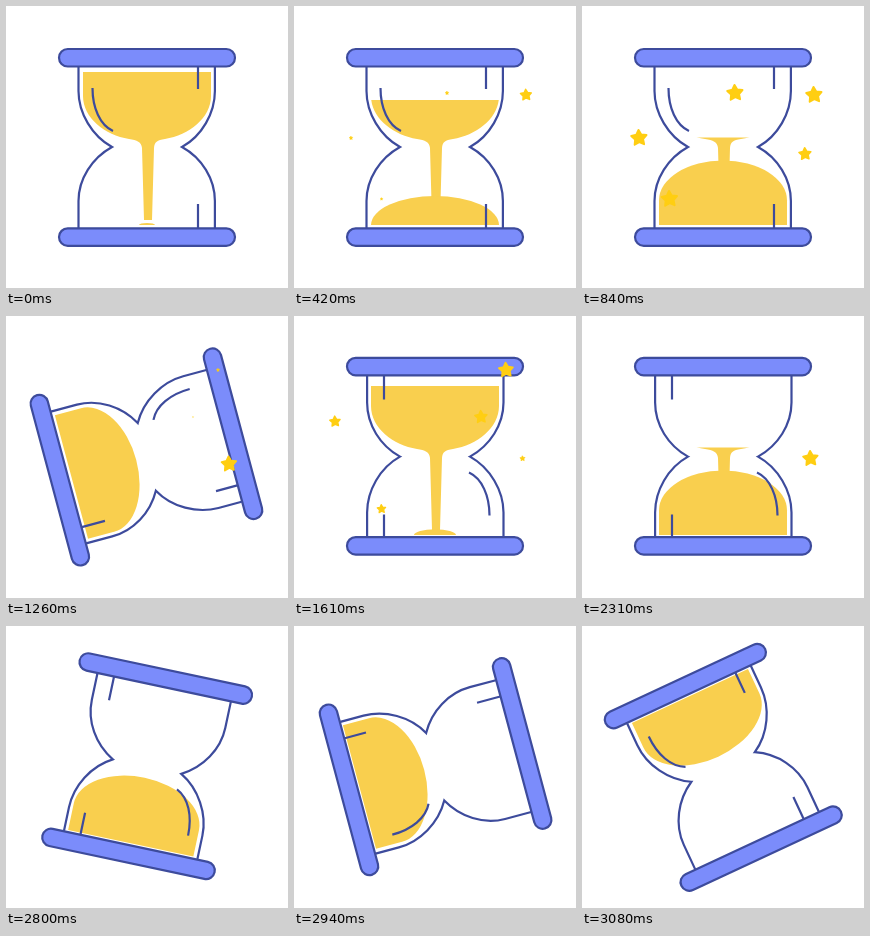
An HTML page that plays this animation: 282 px wide and 282 px high, repeating every 3150 ms.

```html
<!DOCTYPE html>
<html lang="en">
<head>
<meta charset="utf-8">
<title>Hourglass</title>
<style>
html, body { margin: 0; width: 100%; height: 100%; overflow: hidden; background: #fff }
svg { display: block; width: 100%; height: 100% }
.line { fill: none; stroke: #3d4b9c; stroke-width: 2.2; stroke-linecap: butt }
.bar { fill: #7b8cfb; stroke: #3d4b9c; stroke-width: 2.2 }
.sand { fill: #f9cf4e }
#stars { fill: #ffce12; stroke: #ffce12; stroke-width: .25; stroke-linejoin: round }
</style>
</head>
<body>
<svg viewBox="0 0 282 282">
  <clipPath id="above"><rect id="level" x="60" width="162" height="160"/></clipPath>
  <g id="sand" class="sand">
    <path clip-path="url(#above)" d="M77 60V90C77 112 99 129 123 133C131 134 135.5 136 136 142L138 214H146L148 142C148.500 136 151 134 159 133C183 129 205 112 205 90V60Z"/>
    <path id="pile"/>
  </g>
  <g id="glass">
    <path class="line" d="M72.500 61V85C72.500 107 86 130 106 141C86 152 72.500 173 72.500 195V222M208.900 61V85C208.900 107 196 130 176 141C196 152 208.900 173 208.900 195V222"/>
    <path class="line" d="M86.500 82C86.500 102 94 119 107 125M192 61V83M192 198V222"/>
    <rect class="bar" x="53" y="43" width="176" height="17.500" rx="8.700"/>
    <rect class="bar" x="53" y="222.300" width="176" height="17.500" rx="8.700"/>
  </g>
  <g id="stars"></g>
</svg>
<script>
const STEP = 70, FRAMES = 45, FLIP = 21, RADIUS = 8;
const $ = id => document.getElementById(id);
const clamp = v => Math.max(0, Math.min(1, v));
const smooth = v => (v = clamp(v)) * v * (3 - 2 * v);

// x, y, time of birth, time of death
const stars = [
  [232, 89, 60, 1150], [153, 87, 300, 1120], [57, 132, 300, 1190],
  [87.5, 193, 330, 1150], [223, 148, 450, 1450], [212, 54, 1150, 2100],
  [187, 101, 1215, 2100], [41, 105.500, 1270, 2200], [87.5, 193, 1330, 2250],
  [228.500, 142.500, 1440, 2500]
];

const starPath = 'M' + Array.from({ length: 10 }, (_, i) => {
  const a = i * Math.PI / 5 - Math.PI / 2 - .06, r = i % 2 ? .52 : 1;
  return [Math.cos(a) * r, Math.sin(a) * r].map(v => v.toFixed(3));
}).join('L') + 'Z';

const starNodes = stars.map(() => {
  const node = document.createElementNS('http://www.w3.org/2000/svg', 'path');
  node.setAttribute('d', starPath);
  return $('stars').appendChild(node);
});

const rotate = (id, angle) => $(id).setAttribute('transform', `rotate(${angle} 141 140.8)`);

function drawSand(time) {
  const poured = smooth(time / 950);
  const fall = Math.max(0, time - 930) * .35;
  $('level').setAttribute('y', 66 + 68 * poured + fall);
  $('above').style.display = '';

  const w = Math.min(64, 8 + 222 * poured), h = 2 + 65 * poured;
  const ry = Math.min(h, 40), side = 219 - h + ry;
  $('pile').setAttribute('d',
    `M${141 - w} 219V${side}A${w} ${ry} 0 0 1 ${141 + w} ${side}V219Z`);
  // the stream ends on the pile
  $('level').setAttribute('height', Math.max(0, 219 - h + 6 - 66 - 68 * poured - fall));
}

function draw(now) {
  const frame = Math.floor(now / STEP) % FRAMES, time = frame * STEP;
  const second = frame >= FLIP;
  const left = (second ? FRAMES : FLIP) - frame;
  const turn = [155, 115, 75, 41, second ? 12 : 0][left - 1] || 0;

  drawSand(time - (second ? FLIP * STEP : 0));
  rotate('sand', turn);
  rotate('glass', turn + (second ? 180 : 0));

  stars.forEach(([x, y, birth, death], i) => {
    const size = clamp(Math.min((time - birth) / 500, (death - time) / 200));
    starNodes[i].setAttribute('transform', `translate(${x} ${y}) scale(${size * RADIUS})`);
  });
}

let start;
function tick(now) {
  start ??= now;
  draw(now - start);
  requestAnimationFrame(tick);
}
draw(0);
requestAnimationFrame(tick);
</script>
</body>
</html>
```
